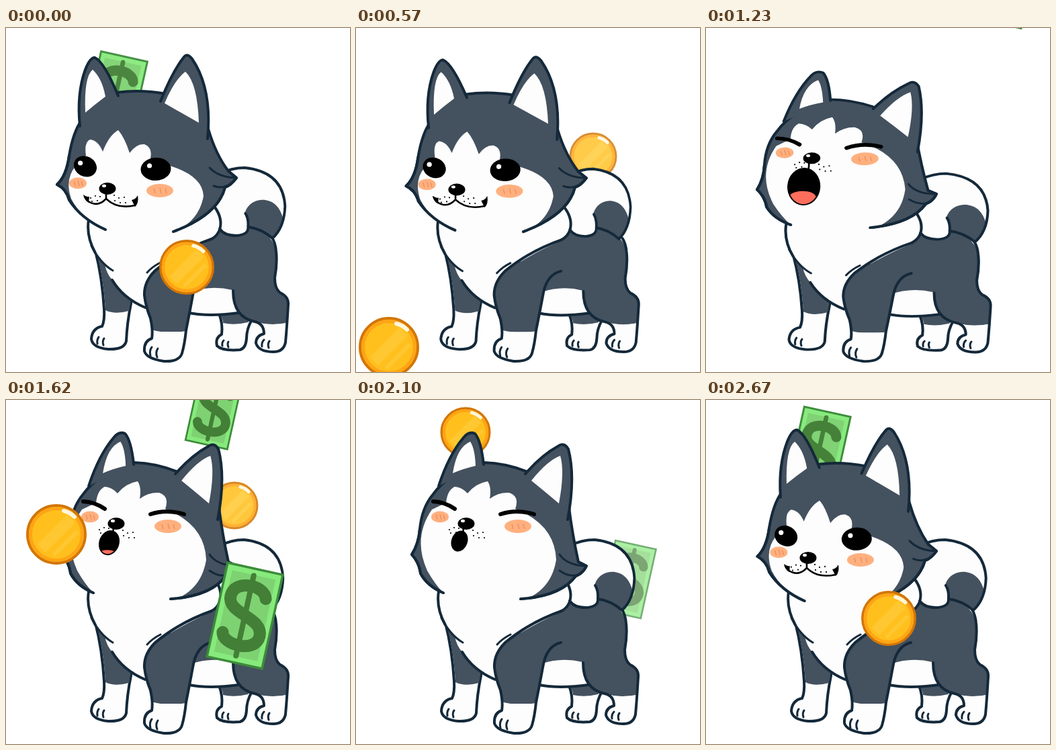
Animation of 512x512 px, one loop 2700 ms. Source, as an HTML page:

```html
<!DOCTYPE html>
<html lang="en">
<head>
<meta charset="utf-8">
<title>Husky and falling money</title>
<style>
html, body { margin: 0; width: 100%; height: 100%; overflow: hidden; background: #fff; }
svg { display: block; width: 100vw; height: 100vh; }
.g { fill: #44515f; }
.w { fill: #fdfdfd; }
.l { fill: none; stroke: #14293a; stroke-width: 4; stroke-linecap: round; stroke-linejoin: round; }
.gl { fill: #44515f; stroke: #14293a; stroke-width: 4; stroke-linecap: round; stroke-linejoin: round; }
.wl { fill: #fdfdfd; stroke: #14293a; stroke-width: 4; stroke-linecap: round; stroke-linejoin: round; }
.t { fill: none; stroke: #14293a; stroke-width: 3; stroke-linecap: round; }
.k { fill: none; stroke: #000; stroke-width: 6; stroke-linecap: round; }
.m { fill: none; stroke: #000; stroke-width: 2.6; stroke-linecap: round; }
</style>
</head>
<body>
<svg viewBox="0 0 512 512">
  <defs>
    <clipPath id="lips"><ellipse id="lipShape"/></clipPath>
    <g id="coin">
      <circle r="43" fill="#ffc01e" stroke="#d27607" stroke-width="4"/>
      <circle r="38.5" fill="none" stroke="#ffa415" stroke-width="5"/>
      <path d="M-22 21 L22 -23" stroke="#ffc832" stroke-width="17" fill="none"/>
      <path d="M-4 31 L31 -4" stroke="#ffc832" stroke-width="6" fill="none"/>
      <path d="M11 -35 Q20 -33 27 -26" stroke="#fff6dc" stroke-width="6" stroke-linecap="round" fill="none"/>
    </g>
    <g id="bill">
      <rect x="-42" y="-71.5" width="84" height="143" fill="#87ea7c" stroke="#3c8b3a" stroke-width="3.5"/>
      <rect x="-33" y="-62" width="66" height="124" fill="#7ed272"/>
      <g fill="none" stroke="#437f36" stroke-linecap="round">
        <path d="M25 -31 C20 -51 -27 -51 -27 -24 C-27 3 28 -4 28 25 C28 52 -24 50 -27 31" stroke-width="18"/>
        <path d="M0 -61 V61" stroke-width="8"/>
      </g>
    </g>
  </defs>
  <g id="back"></g>
  <g id="body">
    <path class="wl" d="M317 425 Q323 440 321 456 Q311 461 314 473 Q322 481 348 479 Q357 477 358 462 Q358 448 366 434 L345 412Z"/>
    <path class="g" d="M318 425 Q323 433 323 439 Q340 443 360 438 L366 432 345 412Z"/>
    <path class="t" d="M322 473 Q321 468 324 465 M331 475 Q329 470 331 467"/>
    <path class="wl" d="M133 332 Q143 370 146 418 Q147 436 143 444 Q128 447 127 463 Q129 476 152 478 Q176 479 179 466 Q180 440 186 410 L190 380Z"/>
    <path class="g" d="M135 335 Q145 370 148 420 Q162 427 183 421 L190 380Z"/>
    <path class="t" d="M136 470 Q135 464 138 460 M145 472 Q143 466 146 462"/>
    <path class="g" d="M123 285 Q119 310 133 335 L147 354 Q150 366 158 375 Q174 402 207 416 L274 424 Q302 430 346 424 Q356 434 370 437 Q392 444 418 439 L421 412 Q421 400 408 394 Q400 388 400 372 Q404 350 402 332 Q399 316 385 305 L355 290 250 270Z"/>
    <path class="w" d="M123 285 Q119 310 133 334 L147 352 Q150 366 158 375 Q174 402 207 415 L207 390 Q210 374 222 362 Q262 334 307 315 Q322 304 319 280 L250 265Z"/>
    <path class="w" d="M275 393 Q305 382 337 390 Q337 412 346 423 Q305 429 272 422Z"/>
    <path class="w" d="M370 437 Q392 444 418 439 Q418 460 415 468 Q412 481 398 480 Q378 480 374 469 Q374 459 385 456 Q386 444 370 437Z"/>
    <path class="l" d="M123 285 Q119 310 133 335 M158 375 Q174 402 207 416 M272 424 Q302 430 346 424 M338 391 Q338 430 370 437 Q384 440 384 455 Q372 458 372 469 Q376 482 398 482 Q413 482 416 468 Q418 446 420 412 Q421 400 408 394 Q400 388 400 372 Q404 350 402 332 Q401 320 396 312"/>
    <path class="t" d="M381 474 Q380 468 384 464 M391 476 Q389 470 392 466 M127 324 Q140 350 159 361 M210 364 Q218 355 230 349"/>
    <path class="g" d="M243 346 Q206 375 206 398 Q208 415 215 432 L217 452 268 452 Q272 420 278 398 Q283 366 305 361Z"/>
    <path class="w" d="M216 449 Q240 456 268 451 Q266 472 262 484 Q256 497 235 496 Q209 492 206 481 Q205 466 217 462Z"/>
    <path class="l" d="M306 314 Q258 331 222 361 Q205 378 206 398 Q208 415 215 432 Q219 450 217 462 Q205 466 206 481 Q209 492 235 496 Q258 497 262 484 Q266 470 268 450 Q274 420 278 398 Q283 366 305 361"/>
    <path class="t" d="M215 488 Q213 480 217 475 M225 490 Q222 483 226 477"/>
    <g id="tail">
      <path class="w" d="M300 240 L326 214 Q338 208 356 208 Q414 214 417 265 Q416 297 398 313 Q382 299 361 296 Q362 308 343 309 Q325 309 318 299 L300 275Z"/>
      <path class="g" d="M356 276 C361 259 376 255 387 256 C402 258 410 269 414 283 Q409 300 398 312 Q382 298 362 295 Q362 282 356 276Z"/>
      <path class="l" d="M318 217 Q336 208 356 208 Q414 214 417 265 Q416 297 398 313 Q382 299 361 296 Q362 308 343 309 Q325 309 318 299 M357 276 Q362 284 361 296"/>
    </g>
    <path class="l" d="M311 267 Q323 284 318 300 Q315 309 306 314"/>
  </g>
  <g id="head">
    <g id="shapes"></g>
    <g id="face"></g>
  </g>
  <g id="front"></g>
</svg>
<script>
const LOOP = 2700, STEP = 30, BEAT = 540;
const NS = 'http://www.w3.org/2000/svg';
const byId = id => document.getElementById(id);
const NUM = /-?\d+(\.\d+)?/g;

function add(parent, tag, attrs) {
  const e = document.createElementNS(NS, tag);
  set(e, attrs);
  return parent.appendChild(e);
}
function set(e, attrs) {
  for (const k in attrs) e.setAttribute(k, attrs[k]);
}
const clamp = (v, a = 0, b = 1) => Math.min(b, Math.max(a, v));
const smooth = v => { v = clamp(v); return v * v * (3 - 2 * v); };
const mix = (a, b, u) => a + (b - a) * u;

// blends two paths that share the same commands
function morph(a, b, u) {
  const n = b.match(NUM);
  let i = 0;
  return a.replace(NUM, v => mix(+v, +n[i++], u).toFixed(2));
}

// class, looking ahead, looking up, is an ear
const shapes = [
  ['gl', 'M148 300 Q112 284 94 256 Q90 240 76 233 Q90 220 94 190 Q100 155 112 138 Q130 106 165 96 Q200 91 238 98 Q286 125 301 150 Q312 188 331 213 L343 223 Q335 234 326 237 Q316 278 249 303',
    'M130 287 Q106 277 96 258 Q94 242 83 230 Q93 215 95 192 Q98 160 115 140 Q138 108 190 93 Q225 94 258 108 Q308 130 317 160 Q322 200 331 241 L343 247 Q338 258 327 262 Q305 292 245 296'],
  ['gl', 'M110 146 Q105 98 118 62 Q125 44 132 44 Q146 50 167 101', 'M123 128 Q138 82 160 56 Q168 46 177 50 Q186 60 190 96', 1],
  ['w', 'M118 126 Q116 72 129 62 Q143 75 148 102 Q132 114 118 126', 'M144 109 Q150 70 170 62 Q177 72 178 98 Q160 102 144 109', 1],
  ['gl', 'M230 109 Q248 64 265 43 Q270 37 277 46 Q307 90 300 165', 'M252 110 Q276 82 302 68 Q310 63 316 73 Q327 115 315 178', 1],
  ['w', 'M236 112 Q251 77 267 65 Q285 82 287 141 Q262 127 236 112', 'M261 120 Q285 90 304 83 Q311 106 302 154 Q282 137 261 120', 1],
  ['w', 'M97 254 Q87 225 104 205 L119 190 Q116 170 125 166 Q137 167 144 184 Q153 160 167 152 Q176 162 184 186 Q194 172 206 173 Q220 178 214 198 Q292 212 294 250 Q288 285 254 302 Q200 322 148 300 Q112 284 97 254Z',
    'M106 254 Q84 205 113 163 L134 153 Q136 134 147 129 Q158 130 166 139 Q178 124 196 121 Q202 130 199 147 Q212 137 228 138 Q244 143 237 162 Q296 185 298 238 Q292 275 262 292 Q200 312 130 287 Q118 275 106 254Z'],
  ['l', 'M148 300 Q112 284 94 256 Q90 240 76 233 Q90 220 94 190 M331 213 L343 223 Q335 234 326 237 Q316 278 249 303',
    'M130 287 Q106 277 96 258 Q94 242 83 230 Q93 215 95 192 M331 241 L343 247 Q338 258 327 262 Q305 292 245 296'],
  ['t', 'M303 208 Q316 222 342 223 M309 235 Q319 239 328 235', 'M303 230 Q314 246 342 247 M303 254 Q316 263 328 261']
].map(([cls, a, b, ear]) => ({ a, b, ear, el: add(byId('shapes'), 'path', { class: cls }) }));

// parts that slide from one spot to another: [x, y] ahead, [x, y] up
const face = byId('face');
const sliders = [];
function part(a, b, html) {
  const el = add(face, 'g', {});
  el.innerHTML = html;
  sliders.push({ a, b, el });
  return el;
}
const blush = (rx, ry) => `<ellipse rx="${rx}" ry="${ry}" fill="#ffb07f"/>
  <path d="M${-rx * .45} -3 l2 7 M0 -4 l2 8 M${rx * .4} -3 l2 7" stroke="#ee8c5c" stroke-width="1.3" fill="none"/>`;
const eye = (rx, ry, tilt) => `<ellipse rx="${rx}" ry="${ry}" transform="rotate(${tilt})"/>
  <circle cx="${-rx * .42}" cy="-5" r="3.6" fill="#fff"/>`;
const dots = list => list.map(([x, y]) => `<circle cx="${x}" cy="${y}" r="1.1"/>`).join('');

part([107, 231], [125, 174], blush(13, 8.5));
part([229, 242], [241, 188], blush(20, 10));
part([151, 239], [164, 179], dots([[-25, 14], [-18, 11], [-23, 19], [-15, 18], [-11, 12]]));
part([151, 239], [164, 184], dots([[10, 10], [17, 14], [25, 13], [11, 18], [19, 21], [27, 21]]));
const open = [
  part([118, 206], [133, 157], eye(17.5, 15, 28)),
  part([223, 210], [241, 166], eye(22.5, 17, -3)),
  part([151, 239], [164, 184], `<path class="m" d="M-2 8 V15 Q-15 29 -30 18 M-2 15 Q14 31 41 25"/>
    <path d="M-36 9 Q-30 13 -27 12 L-28 21 Q-35 17 -36 9Z M45 10 Q42 16 36 17 L41 27 Q47 22 45 10Z"/>`)
];
const shut = [
  part([118, 205], [131, 157], '<path class="k" d="M-16 -6 Q2 -5 16 5"/>'),
  part([223, 210], [239, 167], '<path class="k" d="M-24 3 Q0 -5 26 3"/>')
];
const mouth = add(face, 'g', {});
const lips = add(mouth, 'ellipse', { fill: '#000' });
const tongue = add(add(mouth, 'g', { 'clip-path': 'url(#lips)' }), 'ellipse', { fill: '#ff6d5d' });
add(mouth, 'path', { class: 'm', d: 'M160 190 L159 200' });
part([151, 239], [164, 184], '<ellipse rx="12.5" ry="9"/><ellipse cx="-5" cy="-4" rx="3" ry="2.2" fill="#fff"/>');

// time, x, y, rx, ry, tilt, tongue height
const mouthKeys = [
  [860, 154, 210, 12, 15, 20, 0],
  [1020, 156, 221, 29, 23, 5, 10],
  [1230, 151, 228, 24, 29.5, 5, 11],
  [1620, 153.5, 212.5, 15, 19, 20, 4],
  [2100, 154, 210, 12, 16, 20, 0],
  [2700, 154, 210, 12, 16, 20, 0]
];
function mouthAt(t) {
  let i = 1;
  while (i < mouthKeys.length - 1 && mouthKeys[i][0] < t) i++;
  const a = mouthKeys[i - 1], b = mouthKeys[i];
  const u = smooth((t - a[0]) / (b[0] - a[0]));
  return a.map((v, k) => mix(v, b[k], u));
}

// centre at time `at`, width, speed in px per ms; `end` is the height where a far item has faded
const items = [
  { kind: 'coin', at: 0, x: 269, y: 356, w: 82, vx: -.1, vy: 1.03 },
  { kind: 'coin', at: 570, x: 49, y: 475, w: 90, vx: -.11, vy: 1.03 },
  { kind: 'coin', at: 1620, x: 75, y: 200, w: 90, vx: -.11, vy: 1.03 },
  { kind: 'bill', at: 1620, x: 355.5, y: 321, w: 87, vx: -.225, vy: 1.025 },
  { kind: 'bill', at: 0, x: 163, y: 101, w: 73, vx: -.16, vy: .83, end: 200 },
  { kind: 'bill', at: 1020, x: 171.5, y: 49.5, w: 75, vx: -.16, vy: .83, end: 200 },
  { kind: 'bill', at: 1620, x: 310, y: 13.5, w: 66, vx: -.16, vy: .74, end: 340 },
  { kind: 'bill', at: 2100, x: 405, y: 267, w: 64, vx: -.17, vy: .74, end: 340 },
  { kind: 'coin', at: 570, x: 353, y: 191, w: 71, vx: -.17, vy: .83, end: 340 },
  { kind: 'coin', at: 1620, x: 340, y: 157, w: 71, vx: -.17, vy: .83, end: 340 },
  { kind: 'coin', at: 2100, x: 163, y: 48, w: 75, vx: -.15, vy: .83, end: 340 }
];
for (const it of items) it.el = add(byId(it.end ? 'back' : 'front'), 'use', { href: '#' + it.kind });

function drop(it, t) {
  const dt = (t - it.at + LOOP * 1.5) % LOOP - LOOP / 2;
  const x = it.x + it.vx * dt, y = it.y + it.vy * dt;
  const bill = it.kind === 'bill';
  set(it.el, {
    transform: `translate(${x} ${y}) rotate(${bill ? 12.5 : 0}) scale(${it.w / (bill ? 87 : 90)})`,
    opacity: it.end ? clamp(Math.min(1.1 - y * .0015, (it.end - y) / 100)) : 1
  });
}

function squash(t) {
  const p = t % BEAT;
  if (p < 270) return 1.8 * p / 270;
  return p < 480 ? .9 * (1 + Math.cos(Math.PI * (p - 270) / 210)) : 0;
}

function draw(t) {
  const s = squash(t);
  const up = smooth((t - 780) / 180) * (1 - smooth((t - 2520) / 180));
  const earUp = up + .2 * up * Math.exp(-(((t - 1150) / 250) ** 2));
  const tail = .952 - .052 * Math.sin(2 * Math.PI * (t - 45) / 450);

  items.forEach(it => drop(it, t));
  set(byId('body'), { transform: `translate(273 497) scale(${1 + .024 * s} ${1 - .03 * s}) translate(-273 -497)` });
  set(byId('tail'), { transform: `translate(320 0) scale(${tail} 1) translate(-320 0)` });
  set(byId('head'), {
    transform: `translate(343 247) matrix(${1 + .0246 * s} ${-.037 * s} ${.035 * s} ${1 - .05 * s} 0 0) translate(-343 -247)`
  });

  for (const p of shapes) p.el.setAttribute('d', morph(p.a, p.b, p.ear ? earUp : up));
  for (const p of sliders)
    set(p.el, { transform: `translate(${mix(p.a[0], p.b[0], up)} ${mix(p.a[1], p.b[1], up)})` });

  const howl = up > .5;
  open.forEach(e => set(e, { display: howl ? 'none' : 'inline' }));
  shut.concat(mouth).forEach(e => set(e, { display: howl ? 'inline' : 'none' }));

  const [, cx, cy, rx, ry, tilt, th] = mouthAt(t);
  const oval = { cx, cy, rx, ry, transform: `rotate(${tilt} ${cx} ${cy})` };
  set(lips, oval);
  set(byId('lipShape'), { ...oval, rx: rx - 2, ry: ry - 2 });
  set(tongue, { cx: cx - 3, cy: cy + ry - th * 1.05, rx: rx * .85, ry: th });
  set(mouth, { transform: `translate(${-13 * (1 - up)} ${55 * (1 - up)})` });
}

const start = performance.now();
function tick() {
  const t = (performance.now() - start) % LOOP;
  draw(Math.floor(t / STEP) * STEP);
  requestAnimationFrame(tick);
}
draw(0);
requestAnimationFrame(tick);
</script>
</body>
</html>
```
